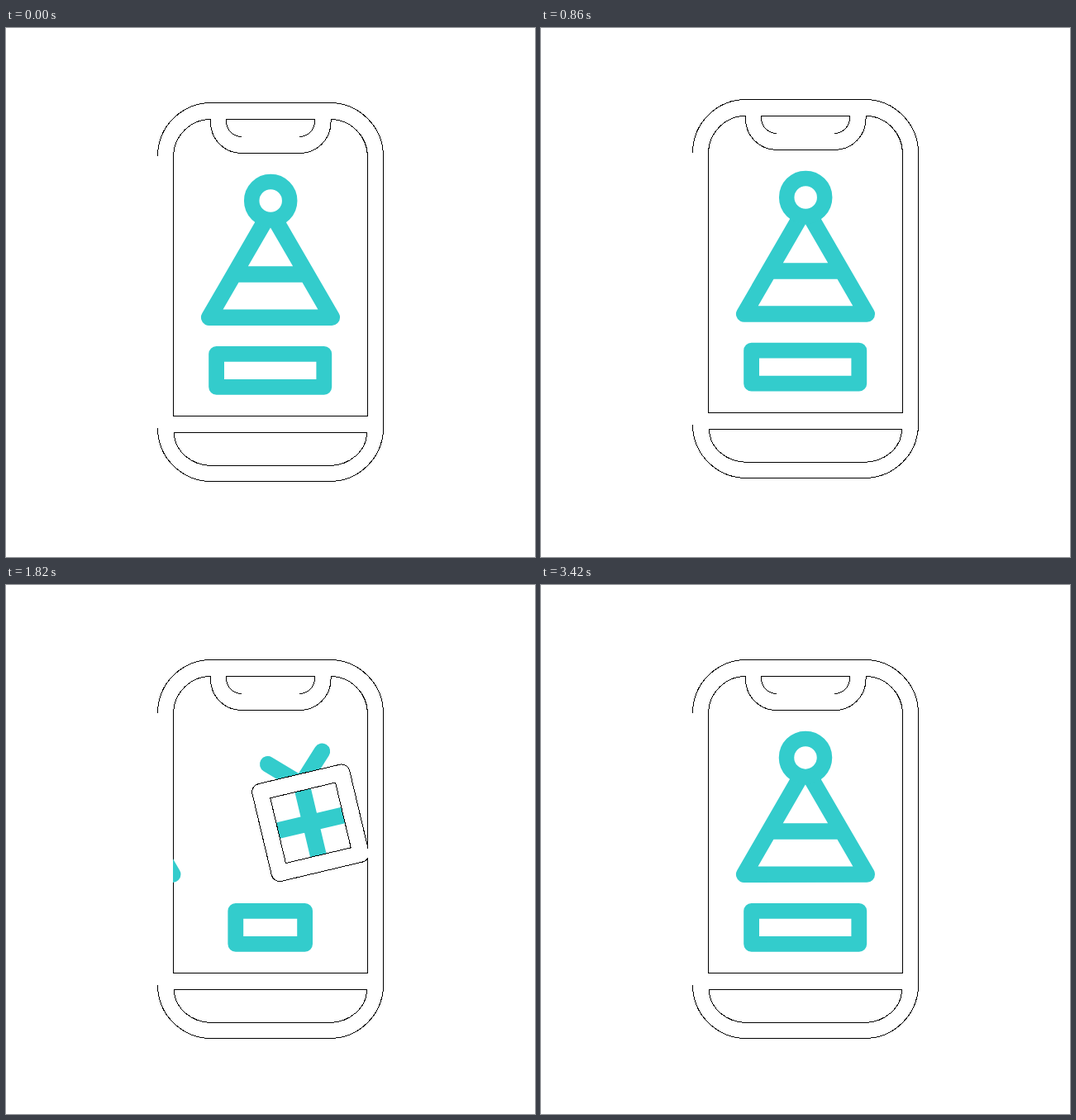
Animation of 640 by 640 pixels, one loop 3600 ms. Source, as an HTML page:

```html
<!DOCTYPE html>
<html>
<head>
<meta charset="utf-8">
<style>
  html, body { margin: 0; width: 100%; height: 100%; overflow: hidden; background: #fff; }
  svg { display: block; width: 100vw; height: 100vh; }
  .line { fill: none; stroke: #000; stroke-width: 1; shape-rendering: crispEdges; }
  .white { fill: #fff; }
  .teal { fill: none; stroke: #33cccc; stroke-width: 19.5; stroke-linecap: round; stroke-linejoin: round; }
</style>
</head>
<body>
<svg viewBox="0 0 640 640">
  <clipPath id="screen"><rect x="202" y="110" width="236" height="360"/></clipPath>
  <g id="phone">
    <!-- body, screen with notch, speaker, chin -->
    <path class="line" d="M183.5 155A65 64.5 0 0 1 248.5 90.5H391.5A65 65 0 0 1 456.5 155.5V484A65 65 0 0 1 391.5 548.5H248.5A65 64.5 0 0 1 183.5 484"/>
    <path class="line" d="M247.5 110.5A45 46 0 0 0 202.5 156.5V469.5H437.5V156.5A45 46 0 0 0 393 110.5V114A37.500 37.500 0 0 1 355.500 151.500H285A37.500 37.500 0 0 1 247.500 114Z"/>
    <path class="line" d="M285 131.500A18.500 18.500 0 0 1 266.500 113V110.500H373.500V113A18.500 18.500 0 0 1 355 131.500"/>
    <path class="line" d="M203.500 489.500H436.500A46 40 0 0 1 391 529.500H249A46 40 0 0 1 203.500 489.500Z"/>
    <g clip-path="url(#screen)">
      <rect id="bar" class="teal" y="394.3" height="40" style="stroke-width:18.8"/>
      <g id="hat">
        <path class="teal" d="M245.700 350.200H394.300L320 222ZM276 298H364"/>
        <circle class="teal" cx="320.200" cy="209" r="23" style="fill:#fff;stroke-width:18.500"/>
      </g>
      <g id="gift">
        <path class="teal" d="M285 219L318.700 252L352.500 219"/>
        <rect class="white" x="258.500" y="239.500" width="121" height="121" rx="10"/>
        <path class="line" d="M268.500 360.500A10 10 0 0 1 258.500 350.500V249.500A10 10 0 0 1 268.500 239.500H369.500A10 10 0 0 1 379.500 249.500V350.500A10 10 0 0 1 369.500 360.500"/>
        <path class="line" id="base" d="M268.500 360.500H369.500"/>
        <path class="teal" d="M319 259.500V340.500M278.500 300H359.500" style="stroke-linecap:butt;stroke-width:20"/>
        <rect class="line" x="278.500" y="259.500" width="81" height="81"/>
      </g>
    </g>
  </g>
</svg>
<script>
  const LOOP = 3600, JUMP = 38.2, EXIT = 245, ENTRY = 305, TILT = 17;
  const el = id => document.getElementById(id);
  const phone = el('phone'), bar = el('bar'), hat = el('hat'), gift = el('gift'), base = el('base');

  // Smooth 0 to 1 progress between two times
  const ease = (t, from, to) => {
    const x = Math.min(1, Math.max(0, (t - from) / (to - from)));
    return x * x * (3 - 2 * x);
  };

  // Slide, then lean on the leading bottom corner
  const place = (node, x, angle, pivot) =>
    node.setAttribute('transform', `translate(${x} 0) rotate(${angle} ${pivot})`);

  function draw(now) {
    const t = now % LOOP;
    const hop = start => ease(t, start, start + 300) - ease(t, start + 300, start + 600);
    const first = ease(t, 1400, 2000), second = ease(t, 2600, 3200);
    const giftTilt = TILT * (first - ease(t, 2000, 2600));
    const hatTilt = TILT * (second - ease(t, 3200, 3430));

    phone.setAttribute('transform', `translate(0 ${-JUMP * (hop(200) + hop(800))})`);

    if (t < 2600) place(hat, -EXIT * first, 0, '236 360');
    else place(hat, ENTRY * (1 - second), -hatTilt, '236 360');

    place(gift, ENTRY * (1 - first) - EXIT * second, -giftTilt, '259 361');
    gift.style.display = t > 1400 && t < 3200 ? '' : 'none';
    base.style.display = giftTilt > 0.3 ? '' : 'none';

    const width = 130.2 - 59 * (first - second);
    bar.setAttribute('x', 319.7 - width / 2);
    bar.setAttribute('width', width);
  }

  const begin = performance.now();
  function tick() {
    draw(performance.now() - begin);
    requestAnimationFrame(tick);
  }
  tick();
</script>
</body>
</html>
```
